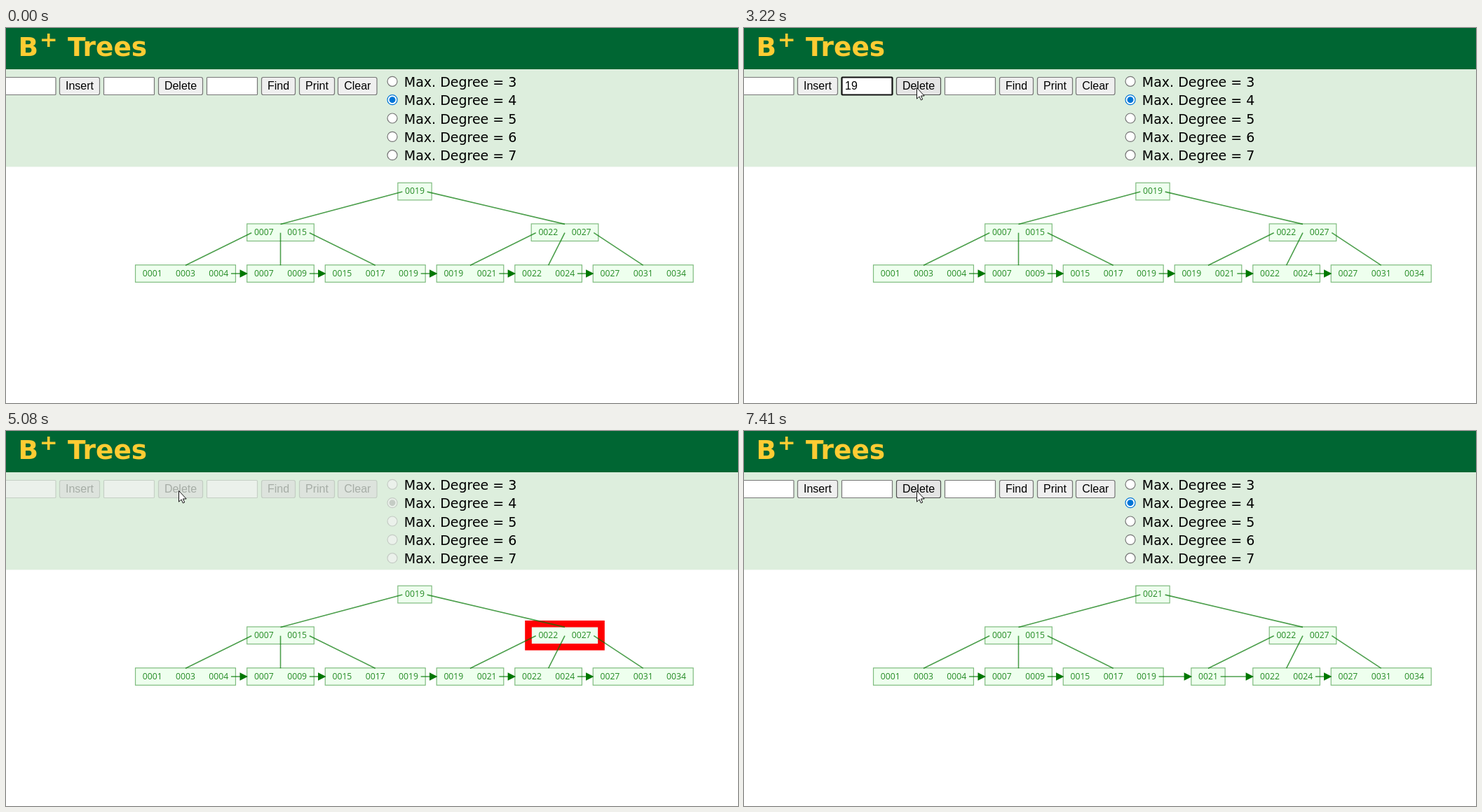
An HTML page for the animation above (8000 ms loop, 1044 by 536 pixels).

```html
<!DOCTYPE html>
<html lang="en">
<head>
<meta charset="utf-8">
<title>B+ Trees</title>
<style>
  html, body { margin: 0; width: 100%; height: 100%; overflow: hidden; background: #fff; }
  svg { display: block; width: 1044px; height: 536px; }
  .title { font: bold 37.5px "DejaVu Sans", sans-serif; fill: #fc3; }
  .label { font: 19px "DejaVu Sans", sans-serif; }
  .ui { font: 16px "Liberation Sans", Arial, sans-serif; }
  .key { font: 12.2px "Open Sans", "Noto Sans", sans-serif; fill: #070; fill-opacity: .85; text-anchor: middle; }
  .note { font: 12.3px "Open Sans", "Noto Sans", sans-serif; fill: #333; }
  svg text { font-kerning: none; }
  .edge { stroke: #070; stroke-opacity: .7; stroke-width: 1.6; }
</style>
</head>
<body>
<svg id="stage" viewBox="0 0 1044 536"></svg>
<script>
const LOOP = 8000;
const KEY_W = 47.3, NODE_H = 24.6, INSET = 6.5;
const ROWS = [233.6, 292.2, 351];

// Each step changes only the listed properties; the rest carries over.
const STEPS = [
  { t: 0, value: '', focus: false, caret: false, hover: false, disabled: false,
    note: '', cursor: null, hot: '', hotEdge: '', glow: 0 },
  { t: 460, cursor: ['arrow', 294, 173] },
  { t: 920, cursor: ['beam', 168, 78], focus: true, ring: true },
  { t: 1380, cursor: ['beam', 171, 79.5], ring: false },
  { t: 1840, value: '1', caret: true },
  { t: 2300, caret: false },
  { t: 2760, value: '19', caret: true, cursor: ['beam', 211.5, 88] },
  { t: 3220, caret: false, hover: true, cursor: ['arrow', 246, 85] },
  { t: 3680, value: '', focus: false, disabled: true, note: 'Deleting 0019' },
  { t: 4140, note: '', hot: 'root', glow: 4.6 },
  { t: 4600, hotEdge: 'root-right', glow: 6.4 },
  { t: 5080, hot: 'right', hotEdge: '', glow: 9 },
  { t: 5540, hotEdge: 'right-d', glow: 7.2 },
  { t: 6000, glow: 4.4 },
  { t: 6470, hot: 'd', hotEdge: '', glow: 8 },
  { t: 6950, glow: 7.2, leaf: ['', '0021'] },
  { t: 7410, hot: '', disabled: false, root: '0021', leaf: ['0021'] }
];

const states = [];
STEPS.forEach((s, i) => states.push({ ...states[i - 1], ...s }));

const rect = (x, y, w, h, fill, rest = '') =>
  `<rect x="${x}" y="${y}" width="${w}" height="${h}" fill="${fill}" ${rest}/>`;
const text = (cls, x, y, s, rest = '') =>
  `<text class="${cls}" x="${x}" y="${y}" ${rest}>${s}</text>`;
const line = (a, b, rest) =>
  `<line x1="${a[0]}" y1="${a[1]}" x2="${b[0]}" y2="${b[1]}" ${rest}/>`;

function button(x, right, label, s) {
  const over = s.hover && label === 'Delete' && !s.disabled;
  const fill = s.disabled ? '#dde3dd' : over ? '#e5e5e5' : '#efefef';
  const rim = s.disabled ? '#c3cdc3' : over ? '#4f4f4f' : '#767676';
  return rect(x + .5, 70.5, right - x - 1, 25, fill, `stroke="${rim}" stroke-width="1.2" rx="2.5"`) +
    text('ui', (x + right) / 2, 88, label,
      `text-anchor="middle" fill="${s.disabled ? '#a6ada6' : '#000'}"`);
}

function field(x, s, focus) {
  const rim = s.disabled ? '#c6d0c6' : focus ? '#101010' : '#767676';
  const fill = s.disabled ? '#ebf1eb' : '#fff';
  return rect(x + .5, 70.5, 72, 25, fill,
    `stroke="${rim}" stroke-width="${focus ? 2.2 : 1.2}" rx="1"`);
}

function radio(i, s) {
  const y = 76.3 + 26.35 * i, on = i === 1;
  const color = s.disabled ? '#c5ccc5' : on ? '#0075d7' : '#767676';
  const fill = s.disabled ? '#ebf1eb' : '#fff';
  return `<circle cx="551" cy="${y}" r="7" fill="${fill}" stroke="${color}" stroke-width="1.2"/>` +
    (on ? `<circle cx="551" cy="${y}" r="4.5" fill="${color}"/>` : '') +
    text('label', 567.8, 84 + 26.35 * i, 'Max. Degree = ' + (i + 3));
}

function panel(s) {
  let out = rect(0, 0, 1044, 198.4, '#ded') + rect(0, 0, 1044, 59, '#063') +
    text('title', 17.5, 40, 'B') +
    text('title', 47.8, 27, '+', 'style="font-size:31px"') +
    text('title', 88, 40, 'Trees');
  out += field(-1.5, s) + field(139, s, s.focus) + field(286, s);
  out += [[76, 134, 'Insert'], [217, 281, 'Delete'], [364, 413, 'Find'],
    [418, 469, 'Print'], [473, 529.5, 'Clear']].map(b => button(...b, s)).join('');
  for (let i = 0; i < 5; i++) out += radio(i, s);
  if (s.value) out += text('ui', 144, 88, s.value);
  if (s.caret) out += rect(141 + 10 * s.value.length, 73, 1, 18, '#000');
  return out + text('note', 1, 219.5, s.note);
}

function makeNodes(s) {
  const nodes = {};
  const add = (id, cx, row, ...keys) => {
    const w = KEY_W * keys.length + 1;
    nodes[id] = { id, cx, cy: ROWS[row], w, keys, left: cx - w / 2, right: cx + w / 2 };
  };
  add('root', 583, 0, s.root || '0019');
  add('left', 391.5, 1, '0007', '0015');
  add('right', 797, 1, '0022', '0027');
  add('a', 256, 2, '0001', '0003', '0004');
  add('b', 391.5, 2, '0007', '0009');
  add('c', 526.7, 2, '0015', '0017', '0019');
  add('d', 662, 2, ...(s.leaf || ['0019', '0021']));
  add('e', 773.6, 2, '0022', '0024');
  add('f', 908.7, 2, '0027', '0031', '0034');
  return nodes;
}

function drawNode(n, s) {
  const top = n.cy - NODE_H / 2, g = s.glow, hot = s.hot === n.id;
  let out = '';
  if (hot) out += rect(n.left - g, top - g, n.w + 2 * g, NODE_H + 2 * g, '#f00');
  out += rect(n.left, top, n.w, NODE_H, '#efe',
    `stroke="${hot ? '#f00' : '#7fbb7f'}" stroke-width="1.2"`);
  n.keys.forEach((k, i) => {
    out += text('key', n.cx + (i - (n.keys.length - 1) / 2) * KEY_W, n.cy + 3.7, k);
  });
  return out;
}

function drawBranch(p, kids, nodes, s) {
  const span = p.w - 2 * INSET;
  return kids.map((id, i) => {
    const a = [p.left + INSET + span * i / (kids.length - 1), p.cy + .5];
    const b = [nodes[id].cx, nodes[id].cy - NODE_H / 2 + .5];
    const hot = s.hotEdge === p.id + '-' + id;
    return (hot ? line(a, b, `stroke="#f00" stroke-width="${s.glow}"`) : '') +
      line(a, b, 'class="edge"');
  }).join('');
}

function drawLink(a, b) {
  const x = b.left + 1.2, y = a.cy;
  return line([a.right - INSET, y], [x - 9, y], 'class="edge"') +
    `<path d="M${x} ${y}l-11.4 -5.7v11.4z" fill="#070"/>`;
}

function tree(s) {
  const n = makeNodes(s), all = Object.values(n);
  const hot = all.filter(v => v.id === s.hot), cold = all.filter(v => v.id !== s.hot);
  let out = [...cold, ...hot].map(v => drawNode(v, s)).join('');
  out += drawBranch(n.root, ['left', 'right'], n, s) +
    drawBranch(n.left, ['a', 'b', 'c'], n, s) +
    drawBranch(n.right, ['d', 'e', 'f'], n, s);
  const leaves = [...'abcdef'];
  for (let i = 0; i < 5; i++) out += drawLink(n[leaves[i]], n[leaves[i + 1]]);
  return out;
}

function pointer(s) {
  if (!s.cursor) return '';
  const [kind, x, y] = s.cursor;
  const ring = s.ring ? `<circle cx="${x}" cy="${y}" r="14" fill="#ff0" fill-opacity=".4"/>` : '';
  const shape = kind === 'arrow'
    ? '<path d="M.5 .5V16.2L4.1 12.9 6.4 18 8.7 17 6.5 12H11.2Z" fill="#fff" stroke="#111"/>'
    : '<path d="M-4 -7.5H-1.5L0 -6.5 1.5 -7.5H4M0 -6.5V6.5M-4 7.5H-1.5L0 6.5 1.5 7.5H4" fill="none" stroke="#222" stroke-width="1.2"/>';
  return ring + `<g transform="translate(${x} ${y})">${shape}</g>`;
}

const stage = document.getElementById('stage');
let shown = null;
function render(time) {
  const t = time % LOOP;
  const s = states.filter(v => v.t <= t).pop();
  if (s !== shown) {
    stage.innerHTML = panel(s) + tree(s) + pointer(s);
    shown = s;
  }
}

const start = performance.now();
function tick() {
  render(performance.now() - start);
  requestAnimationFrame(tick);
}
tick();
</script>
</body>
</html>
```
